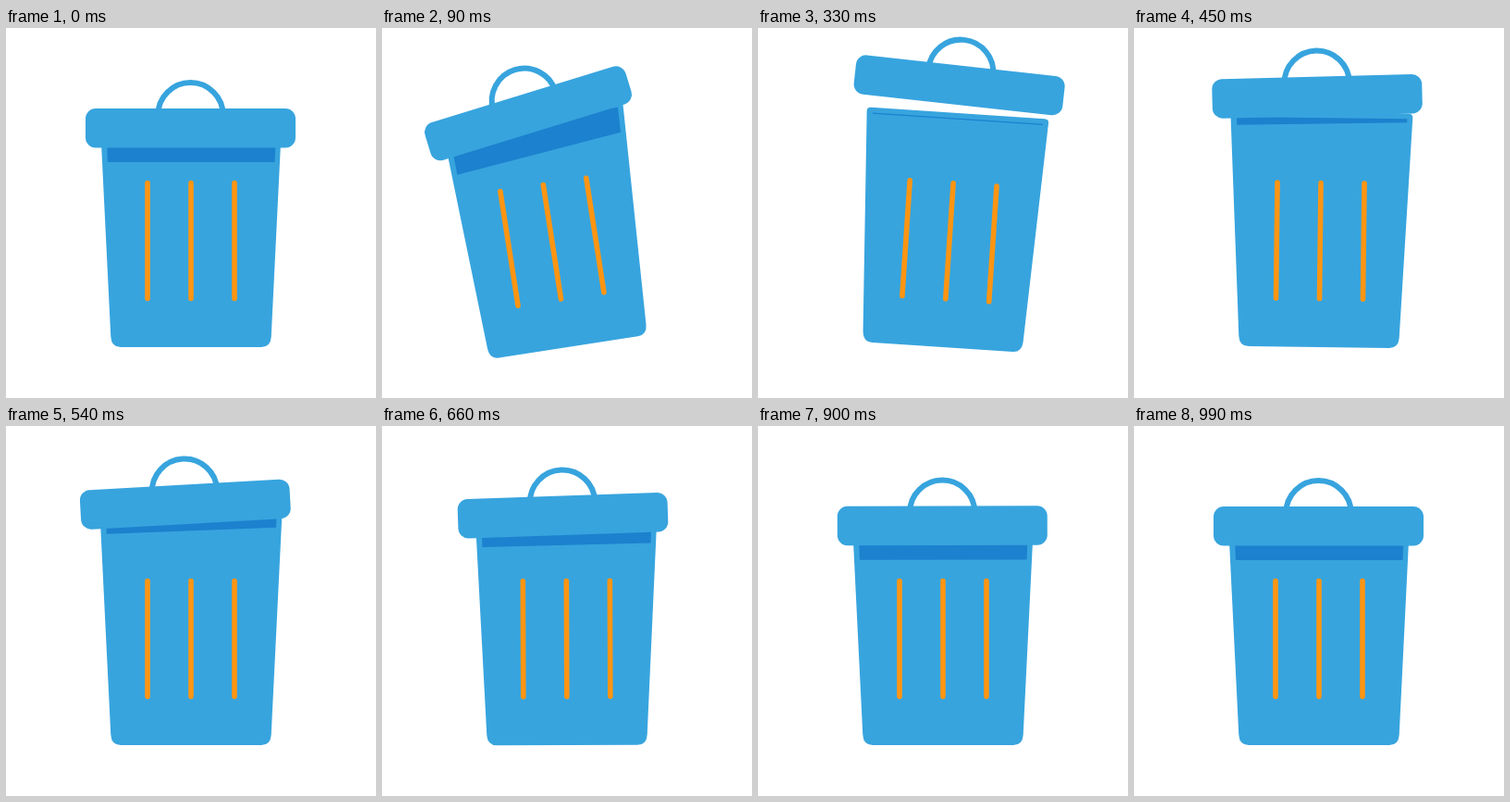
An HTML page that plays this animation: 400x400 px, repeating every 3020 ms.

```html
<!DOCTYPE html>
<html lang="en">
<head>
<meta charset="utf-8">
<title>Trash bin</title>
<style>
  html, body { margin: 0; width: 100%; height: 100%; overflow: hidden; background: #fff; }
  svg { display: block; width: 100%; height: 100%; }
  .blue { fill: #37a4de; }
  .inside { fill: #1c81ce; }
  .stripes { stroke: #fe9512; stroke-width: 5.6; stroke-linecap: round; }
  .handle { fill: none; stroke: #37a4de; stroke-width: 6; }
</style>
</head>
<body>
<svg viewBox="0 0 400 400">
  <g id="bin">
    <path class="blue" d="M106 91.5H294Q298.6 91.5 298.4 96L286.7 334Q286 345 276 345H124Q114 345 113.3 334L101.6 96Q101.4 91.5 106 91.5Z"/>
    <polygon id="inside" class="inside"/>
    <path class="stripes" d="M153 167.5V292.5M200 167.5V292.5M247 167.5V292.5"/>
    <g id="lid">
      <path class="handle" d="M164.3 94.2A35.2 35.2 0 0 1 234.7 94.2"/>
      <rect class="blue" x="86" y="87" width="227" height="42.5" rx="11"/>
    </g>
  </g>
</svg>
<script>
const LOOP = 3020, STEP = 30, PEAK = 330, END = 990;
const el = id => document.getElementById(id);
const bin = el('bin'), lid = el('lid'), inside = el('inside');

// Eases out from one [time, value] pose to the next, starting at rest.
const swing = (...poses) => t => {
  let [t0, v0] = [0, 0];
  for (const [t1, v1] of poses) {
    if (t < t1) return v1 + (v0 - v1) * (1 - (t - t0) / (t1 - t0)) ** 2;
    [t0, v0] = [t1, v1];
  }
  return v0;
};

// Goes from 0 up to 1 at PEAK and settles back to 0 at END.
const hump = (t, rise, bend, fall) => t < PEAK
  ? Math.sin(Math.PI / 2 * t / PEAK) ** rise
  : (1 - ((t - PEAK) / (END - PEAK)) ** bend) ** fall;

const binTilt = swing([120, -9.4], [210, -9.4], [330, 3.8], [540, 0], [600, -0.9], [720, 0]);
const lidTilt = swing([210, -12.3], [330, 2.5], [540, -3.2], [END, 0]);
const lidShift = swing([90, -3.8], [210, -3], [330, 0], [540, -5.7], [END, 0]);

function draw(t) {
  const tilt = lidTilt(t);
  const lift = 47 * hump(t, 1, 1.3, 2.7);

  // The dark opening shrinks and slants as the lid opens.
  const middle = 145 - 47 * hump(t, 1.6, 2, 3.7);
  const slant = Math.max(0, -1.1 * tilt);
  const yl = Math.max(98.3, middle + slant), yr = Math.max(98.3, middle - slant);
  const inset = y => 108 + (y - 97) * 0.04;

  bin.setAttribute('transform', `rotate(${binTilt(t)} 200 335)`);
  lid.setAttribute('transform', `translate(${lidShift(t)} ${-lift}) rotate(${tilt} 199.5 108)`);
  inside.setAttribute('points', `108,97 292.5,97 ${400.5 - inset(yr)},${yr} ${inset(yl)},${yl}`);
}

const start = performance.now();
function tick() {
  const t = (performance.now() - start) % LOOP;
  draw(Math.min(END, Math.floor(t / STEP) * STEP));
  requestAnimationFrame(tick);
}
tick();
</script>
</body>
</html>
```
